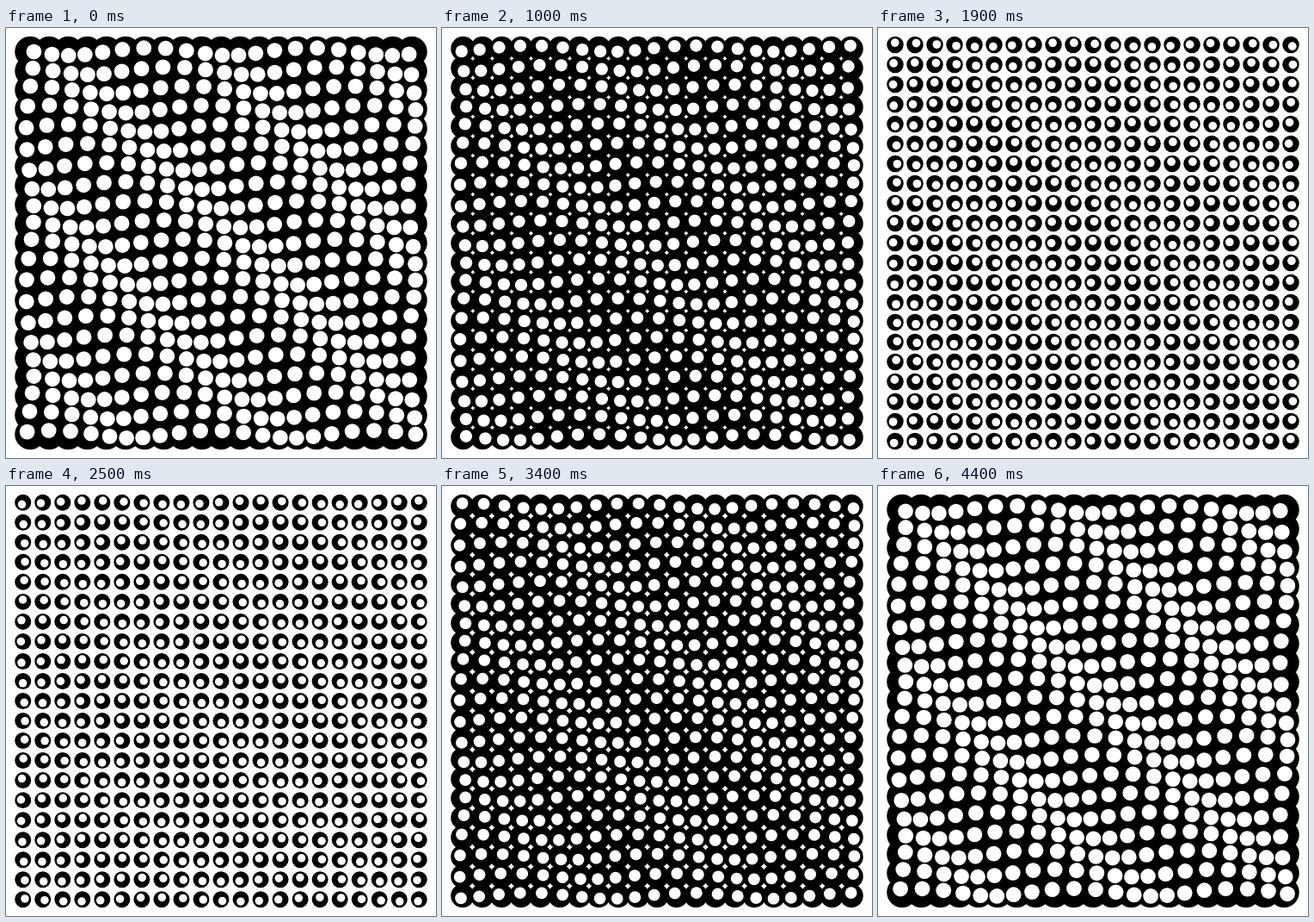
These frames come from a looping animation (500x499 px, 4.5 s). An HTML page:

```html
<!DOCTYPE html>
<html lang="en">
<head>
<meta charset="utf-8">
<title>Rolling dots</title>
<style>
  html, body { margin: 0; width: 100%; height: 100%; overflow: hidden; background: #fff; }
  svg { display: block; width: 100%; height: 100%; }
</style>
</head>
<body>
<svg viewBox="0 0 500 499">
  <g id="discs" fill="#000"></g>
  <g id="dots" fill="#fff"></g>
</svg>
<script>
const LOOP = 4500, STEP = 100, COUNT = 21, SIZE = 479.5;
const CENTER_X = 250, CENTER_Y = 249.5;
const PHASE_STEP = 0.75, TURNS = 3;

function addCircle(parentId) {
  const circle = document.createElementNS("http://www.w3.org/2000/svg", "circle");
  return document.getElementById(parentId).appendChild(circle);
}

function place(circle, x, y, r) {
  circle.setAttribute("cx", x.toFixed(3));
  circle.setAttribute("cy", y.toFixed(3));
  circle.setAttribute("r", r.toFixed(3));
}

const cells = Array.from({ length: COUNT * COUNT }, (_, k) => ({
  col: k % COUNT,
  row: Math.floor(k / COUNT),
  disc: addCircle("discs"),
  dot: addCircle("dots")
}));

function draw(time) {
  const turn = Math.floor(time % LOOP / STEP) * STEP / LOOP * 2 * Math.PI;
  // Disc radius in grid units; the grid is scaled so its outer edge stays put.
  const scale = 0.6 + 0.2 * Math.cos(turn);
  const pitch = SIZE / (COUNT - 1 + 2 * scale);
  const radius = scale * pitch;
  const orbit = radius / 4;
  const middle = (COUNT - 1) / 2;

  for (const { col, row, disc, dot } of cells) {
    const x = CENTER_X + (col - middle) * pitch;
    const y = CENTER_Y + (row - middle) * pitch;
    const angle = (col - row) * PHASE_STEP - TURNS * turn;
    place(disc, x, y, radius);
    place(dot, x + orbit * Math.cos(angle), y + orbit * Math.sin(angle), radius / 2);
  }
}

const start = performance.now();
function tick() {
  draw(performance.now() - start);
  requestAnimationFrame(tick);
}
tick();
</script>
</body>
</html>
```
